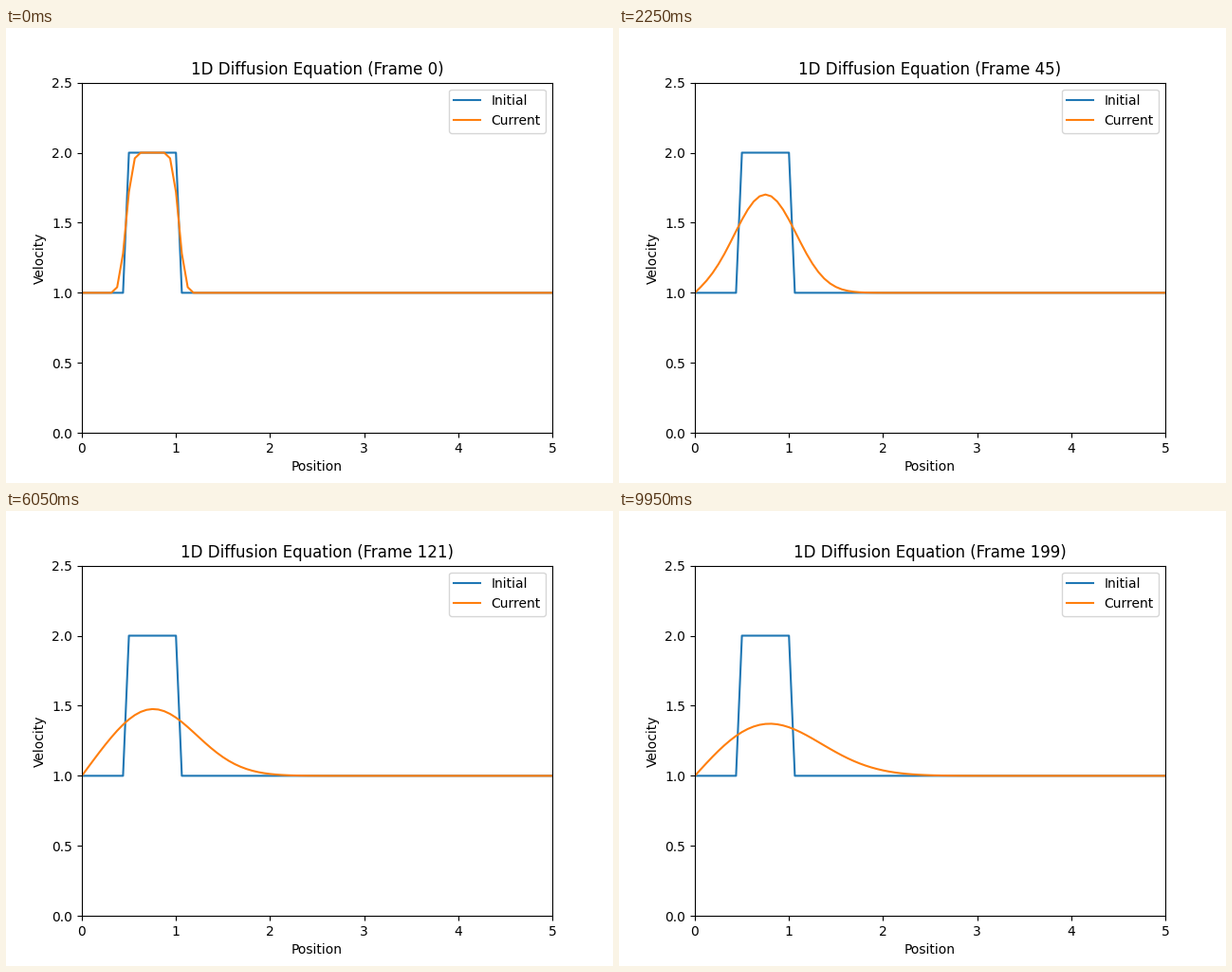
Write a matplotlib script that moves like this. It is 640 px wide and 480 px high and loops after 10000 ms.

```python
import numpy as np
import matplotlib.pyplot as plt
from matplotlib.animation import FuncAnimation

FRAMES = 200
INTERVAL = 50      # ms
LENGTH = 5.0
POINTS = 81
SIGMA = 0.2        # viscosity * dt / dx**2
LEAD_STEPS = 2     # steps already taken when the first frame shows


def diffuse(u):
    """One explicit step with both ends held fixed."""
    new = u.copy()
    new[1:-1] += SIGMA * (u[2:] - 2 * u[1:-1] + u[:-2])
    return new


x = np.linspace(0, LENGTH, POINTS)
initial = np.where((x >= 0.5) & (x <= 1.0), 2.0, 1.0)

states = [initial]
for _ in range(FRAMES + LEAD_STEPS):
    states.append(diffuse(states[-1]))

fig, ax = plt.subplots(figsize=(6.4, 4.8), dpi=100)
ax.plot(x, initial, label="Initial")
(current,) = ax.plot(x, states[LEAD_STEPS], label="Current")
ax.set_xlim(0, LENGTH)
ax.set_ylim(0, 2.5)
ax.set_xlabel("Position")
ax.set_ylabel("Velocity")
ax.legend(loc="upper right")
title = ax.set_title("")


def update(frame):
    current.set_ydata(states[frame + LEAD_STEPS])
    title.set_text(f"1D Diffusion Equation (Frame {frame})")
    return current, title


anim = FuncAnimation(fig, update, frames=FRAMES, interval=INTERVAL,
                     repeat=True, repeat_delay=0, blit=False)
plt.show()
```
